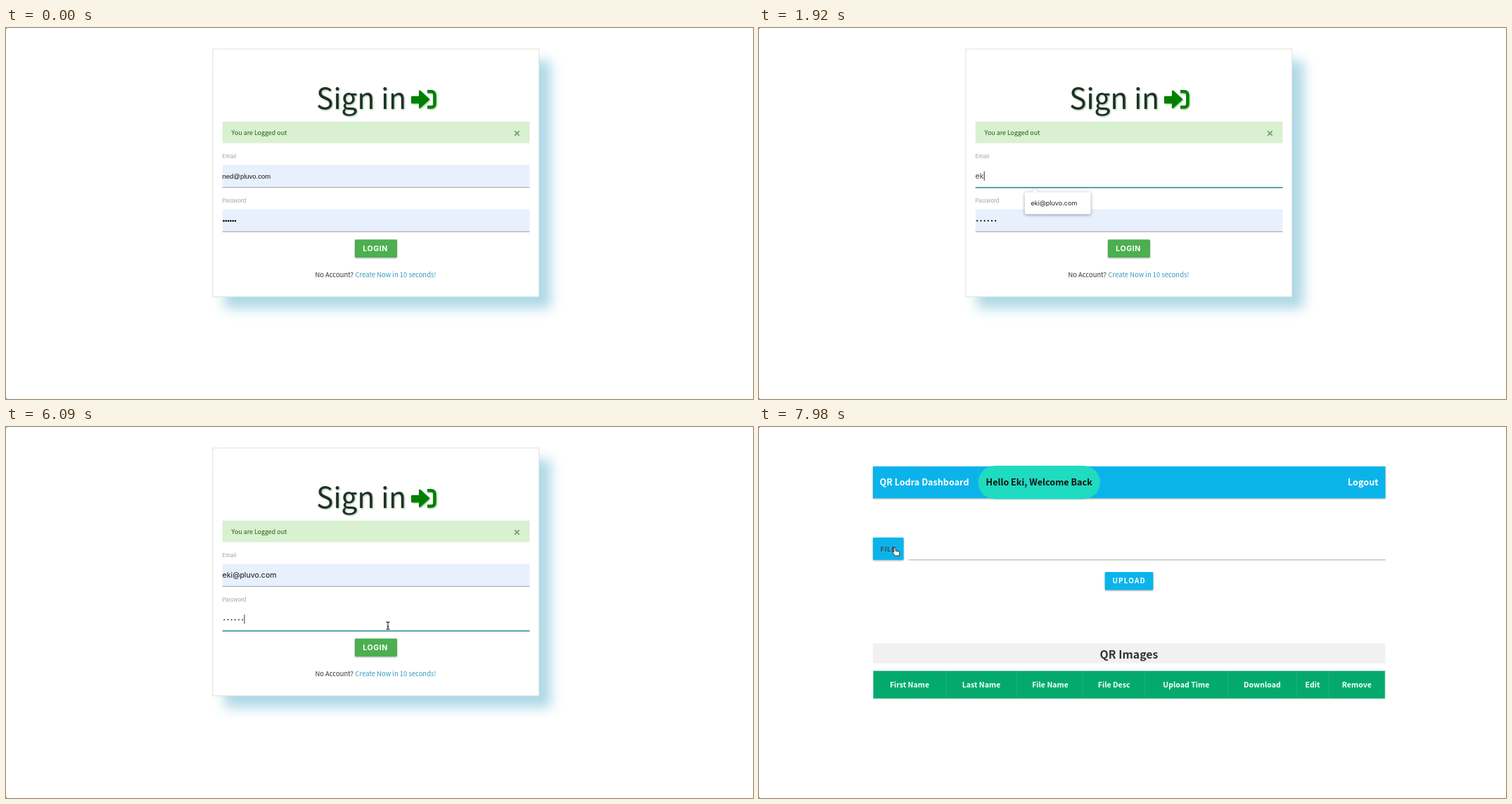
An HTML page for the animation above (8 s loop, 1062x527 px).

```html
<!DOCTYPE html>
<html lang="en">
<head>
<meta charset="utf-8">
<title>Sign in</title>
<style>
html, body { margin: 0; width: 100%; height: 100%; overflow: hidden; background: #fff; }
svg { display: block; width: 1062px; height: 527px; }
text { font-family: "Noto Sans CJK SC", "Noto Sans CJK JP", "Noto Sans CJK", "Open Sans", sans-serif; white-space: pre; }
.ui { font-family: Inter, "Liberation Sans", sans-serif; }
.preview { font-family: "Liberation Sans", Arial, sans-serif; }
.bold { font-weight: 700; }
.mid { text-anchor: middle; }
.soft { filter: drop-shadow(0 1px 1px rgba(0, 0, 0, .35)); }
.glow { filter: drop-shadow(1px 1px 1.3px rgba(0, 128, 0, .45)); }
.pop { filter: drop-shadow(0 1px 2px rgba(0, 0, 0, .4)); }
</style>
</head>
<body>
<svg id="stage" viewBox="0 0 1062 527">
  <g id="login">
    <rect x="310.5" y="46.5" width="464" height="352" fill="#add8e6" style="filter:blur(8.25px)"/>
    <rect x="293.9" y="29.9" width="464" height="352" fill="#fff" stroke="#d3dccb" stroke-width=".8"/>
    <g class="glow">
      <text x="441.3" y="114.6" font-size="40.5" fill="#222e2a">Sign in</text>
      <path d="M599 90.3h5.8a4.6 4.6 0 0 1 4.6 4.6v13a4.6 4.6 0 0 1-4.6 4.6h-5.8" fill="none" stroke="#008000" stroke-width="4.5"/>
      <path d="M577.2 98h11v-8.3l12.8 11.6-12.8 11.6v-6.8h-11z" fill="#008000" stroke="#008000" stroke-width="2.4" stroke-linejoin="round"/>
    </g>
    <rect x="307.7" y="133" width="436.8" height="30.6" fill="#d9f0d1"/>
    <text x="320.6" y="152" font-size="8.9" fill="#215f0c">You are Logged out</text>
    <path d="M723.2 146.4l6.4 6.4m0-6.4l-6.4 6.4" stroke="#73a069" stroke-width="1.7"/>
    <g id="fields"></g>
    <g>
      <rect id="lift" x="496" y="303" width="60" height="26" fill="#000" opacity="0" style="filter:blur(2px)"/>
      <rect class="soft" x="496" y="300.5" width="60" height="25.5" rx="1.4" fill="#4caf50"/>
      <text class="ui bold" x="507.2" y="317.4" font-size="10.6" letter-spacing=".6" fill="#fff">LOGIN</text>
    </g>
    <text x="439.4" y="353.5" font-size="9.45" fill="#333">No Account?</text>
    <text x="496.6" y="353.5" font-size="9.45" fill="#339ab8">Create Now in 10 seconds!</text>

    <g id="saved">
      <g class="pop"><path d="M387.5 233.5l5-5 5 5z" fill="#fff"/><rect x="377.8" y="233.3" width="238.4" height="104" rx="2.5" fill="#fff"/></g>
      <text class="ui" x="406" y="252.3" font-size="9.1" fill="#222">ned@pluvo.com</text>
      <g id="savedDots" fill="#555"></g>
      <circle cx="392" cy="256.6" r="4.3" fill="none" stroke="#5f6368" stroke-width="1.1"/>
      <path d="M388.6 254l3 .4 1 2-2 1.4-2.8-1.6zM393.4 253l2.2 1.4v3l-2.4 2.4-.6-2 1.6-1.6z" fill="#5f6368"/>
      <circle cx="392" cy="289.8" r="5.3" fill="#4285f4"/>
      <text class="ui" x="406" y="293.2" font-size="9.1" fill="#5f6368">Use passwords saved in your Quodel Account</text>
      <path d="M378 305.6h238" stroke="#d5d5d5" stroke-width=".9"/>
      <circle cx="392" cy="321.7" r="4.8" fill="#5f6368"/>
      <text class="ui" x="406" y="325.1" font-size="9.1" fill="#5f6368">Manage Passwords...</text>
      <circle cx="600.5" cy="321.7" r="3.6" fill="#4d86b8"/>
    </g>
    <g id="hint">
      <g class="pop"><path d="M387.5 233.5l5-5 5 5z" fill="#fff"/><rect x="377.8" y="233.3" width="93.8" height="31.2" rx="2.5" fill="#fff"/></g>
      <rect id="hintRow" x="377.8" y="237" width="93.8" height="24" fill="#ececec"/>
      <text class="ui" x="386.4" y="252.3" font-size="9.1" fill="#222">eki@pluvo.com</text>
    </g>
  </g>

  <g id="dash">
    <rect class="soft" x="162" y="56" width="728.5" height="45.2" fill="#0ab4ea"/>
    <rect x="311.6" y="55" width="173.4" height="47.4" rx="23.7" fill="#1fdbc0"/>
    <g class="bold" font-size="12.6" fill="#fff">
      <text x="171.5" y="83.2">QR Lodra Dashboard</text>
      <text class="mid" x="398.2" y="83" fill="#111">Hello Eki, Welcome Back</text>
      <text x="880.5" y="83" text-anchor="end">Logout</text>
    </g>
    <path d="M212.7 188.8h677.8" stroke="#a0a0a0" stroke-width=".9"/>
    <g class="soft" fill="#0ab4ea">
      <rect x="162" y="157" width="43.6" height="31.7" rx="1.3"/>
      <rect x="491.8" y="206" width="68.6" height="25.4" rx="1.3"/>
    </g>
    <text id="file" class="bold" x="172.4" y="177" font-size="9.4" letter-spacing=".5" fill="#fff">FILE</text>
    <text class="bold" x="502.4" y="222.4" font-size="10" letter-spacing="1.1" fill="#fff">UPLOAD</text>
    <rect x="162" y="307.6" width="728.5" height="28" fill="#f1f1f1"/>
    <text class="bold mid" x="526" y="328.7" font-size="15.9" fill="#333">QR Images</text>
    <rect x="162.4" y="346.4" width="727.6" height="39.4" fill="#04aa6d" stroke="#7cc9a8" stroke-width=".7"/>
    <g id="heads" class="bold mid" font-size="10.55" fill="#fff"></g>
  </g>

  <g id="cursor">
    <path id="arrow" d="M0 0V11.5L2.6 9 4.4 13 6.2 12.2 4.5 8.3H8Z" fill="#000" stroke="#fff" stroke-width=".8"/>
    <path id="beam" d="M-2.6-5.3Q0-5.3 0-3.8V3.8Q0 5.3-2.6 5.3M2.6-5.3Q0-5.3 0-3.8M2.6 5.3Q0 5.3 0 3.8M-1.5 1.6h3" fill="none" stroke="#222" stroke-width="1.1"/>
    <path id="hand" d="M-1.2.6a1.2 1.2 0 0 1 2.4 0V4l4 .7q2 .5 1.8 2.5L6.2 11H.2L-2.9 6.4q.3-1.5 1.7-.5Z" fill="#fff" stroke="#222" stroke-width=".9" stroke-linejoin="round"/>
  </g>
  <circle id="ring" r="11.5" fill="none" stroke="#111" stroke-width="1.3"/>
  <path d="M0 0h1v1H0zM0 526h1v1H0z" fill="#555"/>
</svg>
<script>
const LOOP = 8000, STEP = 30;
const $ = id => document.getElementById(id);
const set = (id, attrs) => { for (const k in attrs) $(id).setAttribute(k, attrs[k]); };
const show = (id, on) => { $(id).style.display = on ? "" : "none"; };
const within = (t, a, b) => t >= a && t < b;
const ramp = (t, a, b) => Math.min(1, Math.max(0, (t - a) / (b - a)));
const smooth = p => p * p * (3 - 2 * p);
const easeOut = p => 1 - (1 - p) * (1 - p);
const last = (steps, t) => steps.filter(s => s[0] <= t).pop();
const six = fn => Array.from({ length: 6 }, (_, i) => fn(i)).join("");

const field = (id, label, y) => `
  <text x="307.5" y="${y - 9.2}" font-size="7.6" fill="#9e9e9e">${label}</text>
  <rect id="${id}Bg" x="307.7" y="${y}" width="436.8" height="31.7" fill="#e8f0fe"/>
  <path d="M307.7 ${y + 31.9}h436.8" stroke="#999" stroke-width=".9"/>
  <rect id="${id}Focus" x="307.7" y="${y + 31.4}" width="436.8" height="1.6" fill="#2c939b"/>
  <rect id="${id}Sel" x="307.8" y="${y + 9}" width="31" height="13.4" fill="#a9cdf5"/>`;

$("fields").innerHTML = field("mail", "Email", 194.5) + field("pass", "Password", 257.5) +
  `<text id="mailText" x="307.6"></text>
   <g id="dots">${six(() => "<circle/>")}</g>
   <rect id="caret" width=".9" height="13" fill="#222"/>`;
$("savedDots").innerHTML = six(i => `<circle cx="${408 + i * 4.6}" cy="265" r=".85"/>`);

const heads = [["First Name", 214, 266], ["Last Name", 316, 366], ["File Name", 414, 461], ["File Desc", 504.7, 548],
  ["Upload Time", 607.3, 667], ["Download", 715.4, 764], ["Edit", 787, 810], ["Remove", 849.8, 890]];
$("heads").innerHTML = heads.map(([name, x, edge]) =>
  `<text x="${x}" y="370.2">${name}</text><path d="M${edge} 347v38.5" stroke="#fff" stroke-opacity=".1"/>`).join("");

// time, text, autofill preview, filled background
const mailSteps = [
  [0, "ned@pluvo.com", true, true], [810, "ned@pluvo.com", false, true], [1530, "", false, false],
  [1740, "e", false, false], [1890, "ek", false, false],
  [2340, "eki@pluvo.com", true, true], [2550, "eki@pluvo.com", false, true]
];
const dotSteps = [[0, 6], [3150, 1], [3300, 2], [3660, 3], [4020, 4], [4260, 5], [5160, 6]];

// start, end, quadratic curve points, easing
const moves = [
  [30, 660, [654, 494], [490, 320], [396, 208], easeOut],
  [5640, 6420, [405, 219], [595, 279], [532, 311], smooth],
  [6930, 7710, [532, 311], [340, 270], [193, 172], smooth]
];

function pointer(t) {
  const [a, b, p, c, q, ease] = last(moves, t) || moves[0];
  const u = ease(ramp(t, a, b)), v = 1 - u;
  return [0, 1].map(i => v * v * p[i] + 2 * u * v * c[i] + u * u * q[i]);
}

function shape(t, x, y) {
  const box = (l, top, r, bottom) => x >= l && x <= r && y >= top && y <= bottom;
  if (t >= 6930) return t < 6960 || box(162, 157, 206, 189) || box(492, 206, 560, 231) ? "hand" : "arrow";
  if (box(496, 300, 556, 326) || box(497, 344, 612, 356)) return "hand";
  return box(308, 194, 744, 227) || box(308, 257, 744, 290) ? "beam" : "arrow";
}

function drawMail(t) {
  const [, text, preview, filled] = last(mailSteps, t);
  const el = $("mailText");
  el.textContent = text;
  set("mailText", {
    class: preview ? "preview" : "ui", "font-size": preview ? 9.46 : 10.6,
    y: preview ? 214.4 : 214.2, fill: filled ? "#111" : "#444"
  });
  show("mailBg", filled);
  show("mailSel", within(t, 1260, 1530));
  const width = text ? el.getComputedTextLength() : 0;
  if (within(t, 1260, 1530)) set("mailSel", { width });
  set("mailFocus", { opacity: ramp(t, 810, 1080) * (1 - ramp(t, 2550, 2850)) });
  return 307.8 + width;
}

function drawPass(t) {
  const count = last(dotSteps, t)[1], tight = t < 810, typed = t >= 3150;
  [...$("dots").children].forEach((dot, i) => {
    dot.setAttribute("cx", tight ? 309.5 + i * 3.3 : 310.3 + i * 5.18);
    dot.setAttribute("cy", tight ? 274 : 273.8);
    dot.setAttribute("r", tight ? 1.3 : typed ? .95 : 1.12);
    dot.setAttribute("fill", typed ? "#333" : "#000");
    dot.style.display = i < count ? "" : "none";
  });
  show("passBg", !typed);
  show("passSel", within(t, 2550, 3150));
  set("passFocus", { opacity: ramp(t, 2520, 2760) * (1 - ramp(t, 6420, 6540)) });
  return 307.9 + count * 5.1;
}

function render(now) {
  const t = Math.floor(now % LOOP / STEP) * STEP;
  show("login", t < 6930);
  show("dash", t >= 6930);

  if (t < 6930) {
    const mailEnd = drawMail(t), passEnd = drawPass(t);
    const inMail = within(t, 1530, 2340);
    const inPass = within(t, 3150, 4740) || within(t, 5160, 5640) || within(t, 6060, 6450);
    show("caret", inMail || inPass);
    set("caret", inMail ? { x: mailEnd, y: 203.8 } : { x: passEnd, y: 266.5 });
    show("saved", within(t, 810, 1740));
    show("hint", within(t, 1740, 2550));
    show("hintRow", within(t, 2340, 2550));
  }

  const [x, y] = pointer(t), kind = shape(t, x, y);
  show("cursor", within(t, 30, 1530) || t >= 5640);
  set("cursor", { transform: `translate(${x} ${y})` });
  for (const id of ["arrow", "beam", "hand"]) show(id, id === kind);
  set("lift", { opacity: .35 * ramp(t, 6270, 6420) });

  const ring = within(t, 810, 1080) ? 1 - ramp(t, 870, 1080) : within(t, 6450, 6540) ? 1 - ramp(t, 6450, 6540) : 0;
  set("ring", { cx: x, cy: y + .4, opacity: ring });

  const shade = Math.round(255 - 185 * ramp(t, 7710, 7950));
  set("file", { fill: `rgb(${shade},${shade},${shade})` });
}

const start = performance.now();
function tick() {
  render(performance.now() - start);
  requestAnimationFrame(tick);
}
tick();
</script>
</body>
</html>
```
